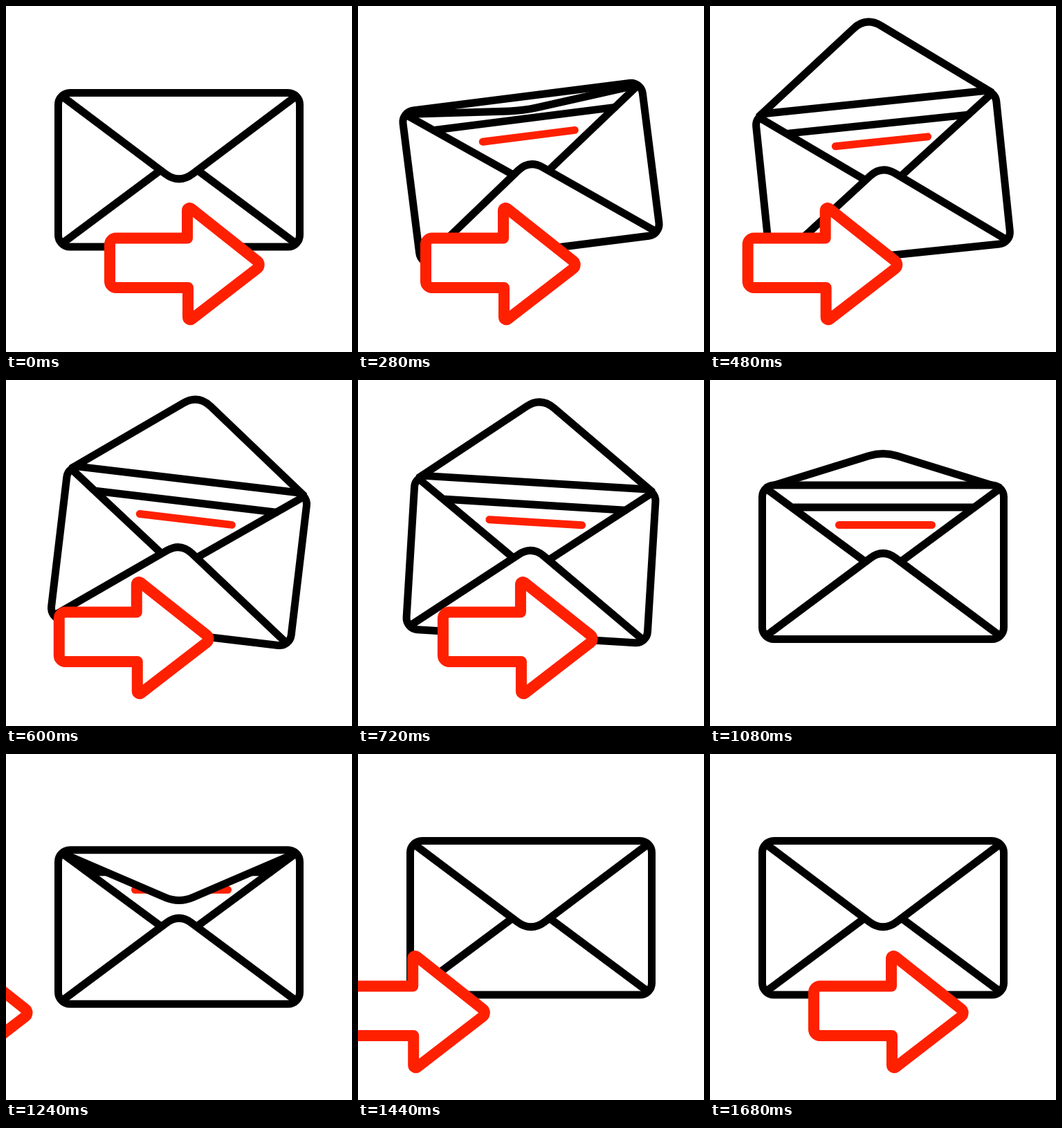
These frames come from a looping animation (500 by 500 pixels, 2 s). An HTML page with a canvas:

```html
<!DOCTYPE html>
<html lang="en">
<head>
<meta charset="utf-8">
<title>Envelope and arrow</title>
<style>
  html, body { margin: 0; width: 100%; height: 100%; overflow: hidden; background: #fff; }
  canvas { display: block; width: 500px; height: 500px; }
</style>
</head>
<body>
<canvas id="stage" width="500" height="500"></canvas>
<script>
const ctx = document.getElementById('stage').getContext('2d');
const LOOP = 2000, STEP = 40;
const BLACK = '#000', RED = '#ff2000', WHITE = '#fff';
const CENTER = { x: 250, y: 236.75 };

// Key poses as [time, value], joined linearly.
const tracks = {
  arrowX: [[40, 0], [520, -104], [1040, 96], [1080, -457], [1680, 0]],
  tilt: [[160, 0], [400, -14.4], [640, 11], [757, 0]],
  drop: [[160, 0], [820, 26.5], [1080, 26.5], [1400, 0]],
  flap: [[160, 1], [435, -1], [984, -1], [1310, 1]]
};

function valueAt(keys, t) {
  if (t <= keys[0][0]) return keys[0][1];
  for (let i = 1; i < keys.length; i++) {
    const [t0, v0] = keys[i - 1], [t1, v1] = keys[i];
    if (t <= t1) return v0 + (v1 - v0) * (t - t0) / (t1 - t0);
  }
  return keys[keys.length - 1][1];
}

function paint(color, width, fill) {
  if (fill) {
    ctx.fillStyle = fill;
    ctx.fill();
  }
  ctx.strokeStyle = color;
  ctx.lineWidth = width;
  ctx.stroke();
}

function line(x0, y0, x1, y1, color) {
  ctx.beginPath();
  ctx.moveTo(x0, y0);
  ctx.lineTo(x1, y1);
  paint(color, 11);
}

// Triangle across the envelope with a softened tip.
function triangle(baseY, tipY, round) {
  const nearY = tipY + (baseY - tipY) * round / 170;
  ctx.beginPath();
  ctx.moveTo(80, baseY);
  ctx.lineTo(250 - round, nearY);
  ctx.quadraticCurveTo(250, tipY, 250 + round, nearY);
  ctx.lineTo(420, baseY);
  paint(BLACK, 11, WHITE);
}

function bodyPath() {
  ctx.beginPath();
  ctx.roundRect(75.5, 125.5, 349, 222.5, 17);
}

function drawEnvelope(tilt, drop, flap) {
  const drawFlap = () => triangle(129.5, 129.5 + 128 * flap, 20);
  ctx.save();
  ctx.translate(CENTER.x, CENTER.y + drop);
  ctx.rotate(tilt * Math.PI / 180);
  ctx.translate(-CENTER.x, -CENTER.y);
  ctx.lineCap = 'butt';
  if (flap < 0) drawFlap();

  bodyPath();
  ctx.fillStyle = WHITE;
  ctx.fill();
  line(80, 129.5, 250, 255, BLACK);
  line(420, 129.5, 250, 255, BLACK);
  ctx.lineCap = 'round';
  line(121, 157.5, 382, 157.5, BLACK);
  line(186.5, 183, 320.5, 183, RED);
  ctx.lineCap = 'butt';
  triangle(344, 217.3, 18);

  if (flap >= 0) drawFlap();
  bodyPath();
  paint(BLACK, 11);
  ctx.restore();
}

function drawArrow(x) {
  ctx.save();
  ctx.translate(x, 0);
  ctx.lineJoin = 'round';
  ctx.beginPath();
  ctx.moveTo(262, 335.5);
  ctx.arcTo(262, 288.4, 370, 374, 3.4);
  ctx.arcTo(370, 374, 263, 456.6, 7);
  ctx.arcTo(263, 456.6, 263, 407, 3.4);
  ctx.lineTo(263, 407);
  ctx.arcTo(150, 407, 150, 335.5, 9);
  ctx.arcTo(150, 335.5, 262, 335.5, 9);
  ctx.closePath();
  paint(RED, 16, WHITE);
  ctx.restore();
}

function draw(now) {
  const t = Math.floor((now % LOOP) / STEP) * STEP;
  const at = name => valueAt(tracks[name], t);
  ctx.fillStyle = WHITE;
  ctx.fillRect(0, 0, 500, 500);
  drawEnvelope(at('tilt'), at('drop'), at('flap'));
  drawArrow(at('arrowX'));
}

const start = performance.now();
function tick() {
  draw(performance.now() - start);
  requestAnimationFrame(tick);
}
tick();
</script>
</body>
</html>
```
